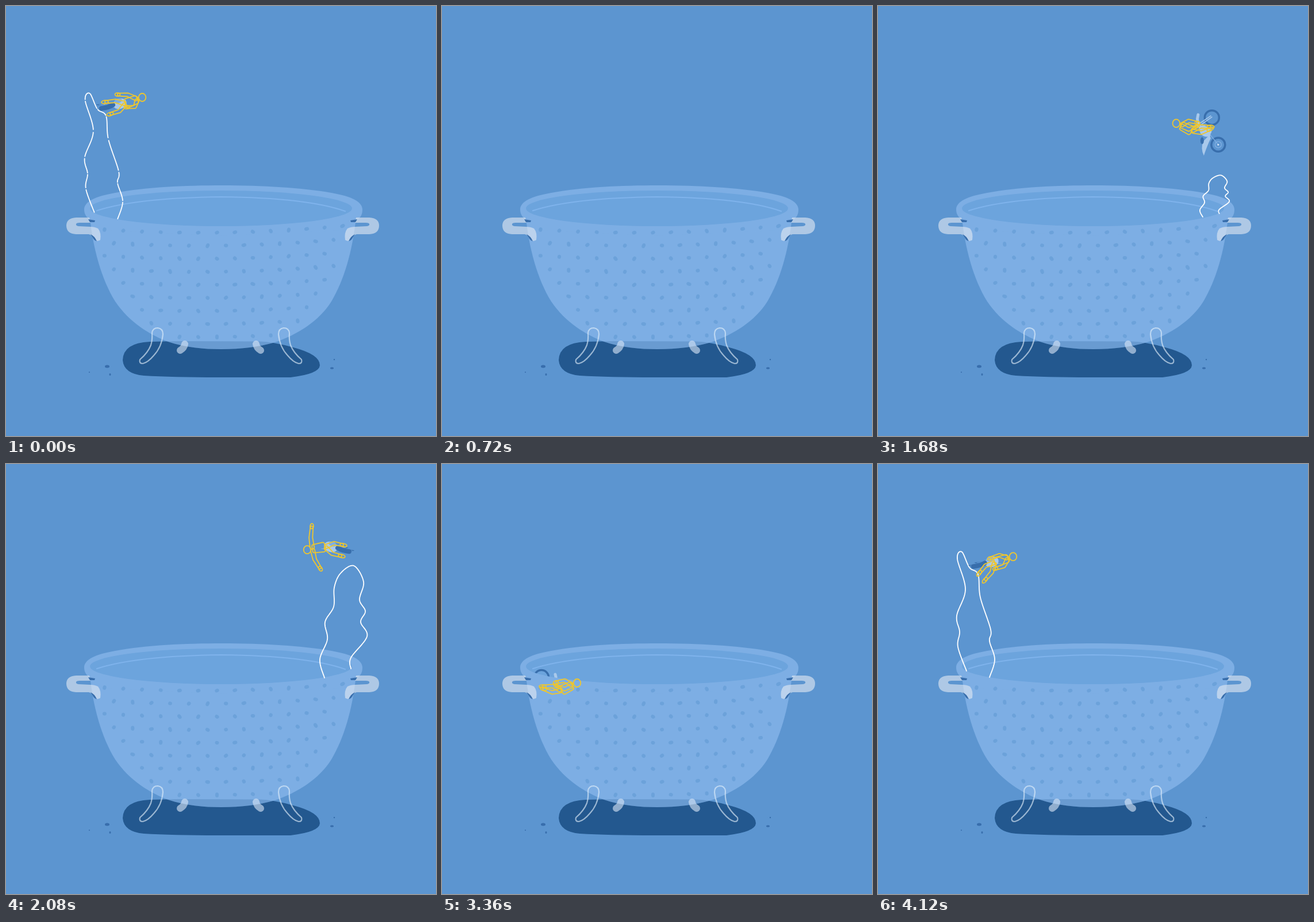
An HTML page with a canvas for the animation above (4.16 s loop, 748 px wide and 748 px high).

```html
<!DOCTYPE html>
<html lang="en">
<head>
<meta charset="utf-8">
<title>Colander ride</title>
<style>
html, body { margin: 0; width: 100%; height: 100%; overflow: hidden; background: #5c95d0; }
canvas { display: block; width: 100vw; height: 100vh; }
</style>
</head>
<body>
<canvas id="stage" width="748" height="748"></canvas>
<script>
const c = document.getElementById('stage').getContext('2d');
const LOOP = 4160, STEP = 40, APEX = 780;
const BG = '#5c95d0', BOWL = '#7daee4', INNER = '#6ca4dd', DARK = '#386eac';
const LIGHT = '#a9c9eb', MIST = '#80afe2', YELLOW = '#efc62c', GLAZE = 'rgba(228,236,244,.6)';

const clamp = (v, a = 0, b = 1) => Math.min(b, Math.max(a, v));
const smooth = v => { v = clamp(v); return v * v * (3 - 2 * v); };
const mix = (a, b, k) => a + (b - a) * k;
const rand = i => { const v = Math.sin(i * 12.9898 + 4) * 43758.5453; return v - Math.floor(v); };

function fill(path, color) { c.fillStyle = color; c.fill(path); }
function stroke(path, color, width) {
  c.strokeStyle = color; c.lineWidth = width; c.stroke(path);
}
function oval(x, y, rx, ry = rx, turn = 0) {
  const p = new Path2D();
  p.ellipse(x, y, rx, ry, turn, 0, 7);
  return p;
}
function placed(x, y, side, draw) {
  c.save();
  c.translate(x, y);
  c.scale(side, 1);
  draw();
  c.restore();
}
function mirrored(axis, draw) {
  draw();
  placed(axis, 0, -1, draw);
}

// ---- colander ----
const shadow = new Path2D('M250 584Q204 586 203 616Q205 640 240 643Q290 646 370 646L495 646Q545 640 546 625Q546 606 500 594Q465 584 440 583.5L300 583Z');
const body = new Path2D('M146 368C151 420 166 476 190 514C214 550 250 572 282 584C312 594 344 597 374 597C410 597 440 593 468 585C506 572 545 548 566 514C588 476 602 430 609 368Z');
const rim = new Path2D('M136 354C136 340 156 331 190 325C245 315 310 312 376 312C446 312 515 316 566 325C600 331 620 340 620 354C620 364 616 369 609 373L590 390L374 400L164 390L147 372C140 368 136 362 136 354Z');
const hollow = oval(374, 352, 228, 31);
const waterline = new Path2D('M158 356C210 339 290 333 374 332C470 333 545 341 590 357');
const handle = new Path2D('M145 368L122 368Q105 369 105 382Q105 396 122 397L144 397Q150 398 153 406Q158 411 164 407Q166 394 160 387Q154 384 146 384L126 383Q121 382 122 379Q123 377 128 377L147 377Z');
const handleShade = new Path2D('M143 371L155 373L154 376L146 376ZM147 397Q154 400 158 409Q153 408 151 403Z');
const foot = new Path2D('M254 569Q255 560 264 560Q273 561 273 571Q271 593 257 608Q247 620 238 622Q231 622 233 615Q247 603 252 590Q255 580 254 569Z');
const backFoot = new Path2D('M311 588Q310 595 303 599');

// staggered rows that narrow with the bowl and bend up at the sides
function drawHoles() {
  for (let row = 0; row < 9; row++) {
    const half = 212 * Math.sqrt(1 - (row / 9.24) ** 2);
    for (let j = -6; j <= 7; j++) {
      const shift = j - (row % 2) / 2;
      const dx = shift * (shift < 0 ? 32.6 : 31.2) - 10;
      if (Math.abs(dx) > half) continue;
      const side = dx / 205, seed = row * 20 + j;
      const y = 394 + 22.7 * row - 8 * side * side - 3 * side;
      fill(oval(377 + dx, y, 3.4 + rand(seed), 3.1, rand(seed + 9) * 3), '#6ca2da');
    }
  }
}

function drawColander() {
  c.fillStyle = BG;
  c.fillRect(0, 0, 748, 748);
  fill(shadow, '#23588f');
  fill(oval(176, 627, 4, 2.5), DARK);
  fill(oval(181, 641, 1.5, 2), DARK);
  fill(oval(145, 637, 1), DARK);
  fill(oval(571, 615, 1.2), DARK);
  fill(oval(567, 630, 3, 1.7), DARK);
  fill(body, BOWL);
  c.save();
  c.clip(body);
  fill(shadow, 'rgba(35,88,143,.22)');
  c.restore();
  fill(rim, BOWL);
  fill(hollow, INNER);
  stroke(waterline, '#7fb3ec', 2.2);
  drawHoles();
  mirrored(754, () => {
    fill(handle, GLAZE);
    fill(handleShade, DARK);
  });
  mirrored(747, () => stroke(foot, 'rgba(228,240,252,.62)', 2.2));
  mirrored(746, () => stroke(backFoot, 'rgba(218,232,248,.6)', 12));
}

// ---- trail: grows from the bowl, then drifts apart into scraps ----
function drawTrail({ points, mid, fadeFor }, s) {
  const grow = smooth((s - 120) / 580);
  const fade = Math.max(0, (s - APEX) / fadeFor);
  if (grow < .02 || fade > 1.4) return;
  const last = points.length - 1;
  const spline = (u, axis) => {
    const i = Math.min(Math.floor(u), last - 1), k = u - i;
    const [p, q, r, z] = [-1, 0, 1, 2].map(d => points[clamp(i + d, 0, last)][axis]);
    return q + .5 * k * (r - p + k * (2 * p - 5 * q + 4 * r - z + k * (3 * (q - r) + z - p)));
  };
  const line = new Path2D();
  let pen = false;
  for (let i = 0; i <= last * 20; i++) {
    const u = i / 20, piece = Math.floor(u);
    const worn = fade * (.5 + rand(piece + mid));
    if (fade && Math.abs(u - piece - .5) > .5 * (1 - worn)) { pen = false; continue; }
    const x0 = spline(u, 0), y0 = spline(u, 1), height = (364 - y0) / 200;
    const x = mid + (x0 - mid) * (.4 + .6 * grow + .15 * fade * height);
    const y = mix(364, y0, grow) - 19 * fade * height;
    pen ? line.lineTo(x, y) : line.moveTo(x, y);
    pen = true;
  }
  stroke(line, '#fff', 1.8 * (1 - .48 * fade));
}

// ---- bike: k flips it from nose up (-1) over edge-on (0) to nose down (1) ----
const blade = new Path2D('M6 -42Q12 -30 7 -17L-4 -6L-6 -12Q0 -24 6 -42Z');
const frame = new Path2D('M-5 -8Q6 -12 12 -3L15 8Q8 13 2 9L-7 4Z');
const fork = new Path2D('M-8 25L23 3M-6 27L25 6');
const bar = new Path2D('M11 5Q20 16 16 29');
const spokes = new Path2D('M-19 -23L-2 -2');
const tyre = new Path2D('M-24 4Q-12 3 -4 -2');

function drawBike(k) {
  c.save();
  c.scale(1, Math.abs(k) < .08 ? .08 : k);
  stroke(oval(-19, -23, 12), DARK, 3.5);
  stroke(oval(-19, -23, 5.5), MIST, 1.3);
  stroke(spokes, MIST, 1.3);
  fill(oval(-19, -23, 1.5), '#d4e5f7');
  stroke(oval(-8, 24, 12.5), DARK, 3.5);
  fill(blade, LIGHT);
  fill(frame, LIGHT);
  stroke(oval(-2, 0, 4.5), LIGHT, 2);
  fill(oval(9, -16, 3, 6), DARK);
  stroke(fork, LIGHT, 1.7);
  stroke(bar, LIGHT, 5);
  c.restore();
  if (Math.abs(k) < .4) {
    fill(oval(8, -4, 12, 9, -.3), LIGHT);
    fill(oval(5, -9, 7, 4, -.3), MIST);
    stroke(tyre, DARK, 8);
  }
}

// ---- rider: head, hip, two hands, two feet; the other joints follow ----
const ride = [[54, -14], [27, -1], [17, -15], [18, -9], [-6, -8], [-5, -4]];
const tuck = [[45, -13], [13, -3], [5, -10], [14, 8], [-14, 16], [-4, 28]];
const reach = [[47, -15], [18, -4], [4, -20], [20, 2], [-18, -7], [-9, 14]];
const star = [[49, 1], [18, -4], [41, -40], [26, 34], [-14, -7], [-11, 12]];
const land = [[47, -31], [16, -21], [21, 2], [26, -12], [-6, 0], [1, 4]];

// closed smooth outline around a chain of joints, tapering from w to tip
function limb(joints, w, tip) {
  const one = [], two = [], n = joints.length - 1;
  joints.forEach(([x, y], i) => {
    const p = joints[Math.max(0, i - 1)], q = joints[Math.min(n, i + 1)];
    const turn = Math.atan2(q[1] - p[1], q[0] - p[0]), r = mix(w, tip, i / n);
    const dx = -Math.sin(turn) * r, dy = Math.cos(turn) * r;
    one.push([x + dx, y + dy]);
    two.unshift([x - dx, y - dy]);
  });
  const ring = [...one, ...two], path = new Path2D();
  const radius = Math.min(3, tip);
  path.moveTo((ring[0][0] + ring[ring.length - 1][0]) / 2, (ring[0][1] + ring[ring.length - 1][1]) / 2);
  ring.forEach((p, i) => path.arcTo ? path.arcTo(...p, ...ring[(i + 1) % ring.length], radius) : path.lineTo(...p));
  path.closePath();
  stroke(path, YELLOW, 1.8);
}

// middle joint of an arm or leg: bends more as its ends come closer
function bend(a, b, side) {
  const dx = b[0] - a[0], dy = b[1] - a[1], d = Math.hypot(dx, dy) || 1;
  const out = side * Math.max(0, 46 - d) * .35 / d;
  return [(a[0] + b[0]) / 2 - dy * out, (a[1] + b[1]) / 2 + dx * out];
}

function drawRider([head, hip, ...ends]) {
  const d = Math.hypot(hip[0] - head[0], hip[1] - head[1]);
  const shoulder = head.map((v, i) => mix(v, hip[i], 9 / d));
  limb([shoulder, hip], 7, 8.5);
  ends.forEach((end, i) => {
    const leg = i > 1, root = leg ? hip : shoulder;
    const joint = bend(root, end, i % 2 ? -1 : 1);
    const turn = Math.atan2(end[1] - joint[1], end[0] - joint[0]);
    limb([root, joint, end], 3.8, 2.4);
    stroke(oval(...end, leg ? 6 : 4.5, 2.9, turn), YELLOW, 1.8);
  });
  stroke(oval(...head, 6.3, 7), YELLOW, 1.8);
}

// ---- motion ----
function poseAt(keys, s) {
  let i = 0;
  while (i < keys.length - 2 && s >= keys[i + 1][0]) i++;
  const [from, a] = keys[i], [to, b] = keys[i + 1], k = smooth((s - from) / (to - from));
  return a.map((p, j) => p.map((v, axis) => mix(v, b[j][axis], k)));
}

const jumps = [
  {
    start: 3360, length: 1520, side: 1, x: [181, 190], top: 174, rise: 221, fall: 252,
    poses: [[0, ride], [420, ride], [760, tuck], [800, reach], [1100, land]],
    trail: {
      mid: 174, fadeFor: 460,
      points: [[154, 360], [139, 318], [142, 292], [137, 264], [152, 218], [138, 165], [146, 153],
        [159, 180], [174, 192], [178, 232], [196, 288], [194, 308], [203, 340], [194, 371]]
    }
  },
  {
    start: 1320, length: 1600, side: -1, x: [572, 573], top: 148, rise: 242, fall: 203,
    poses: [[0, ride], [420, ride], [760, star], [1120, land]],
    trail: {
      mid: 583, fadeFor: 540,
      points: [[554, 372], [546, 340], [559, 305], [555, 275], [570, 248], [571, 215], [582, 190],
        [605, 177], [622, 205], [615, 236], [625, 256], [617, 275], [628, 300], [600, 337], [600, 356]]
    }
  }
];

// everything above the near edge of the opening
const opening = new Path2D('M0 0H748V352H602');
opening.ellipse(374, 352, 228, 31, 0, 0, Math.PI);
opening.lineTo(0, 352);
opening.closePath();

function drawJump(jump, t) {
  const s = (t - jump.start + LOOP) % LOOP;
  if (s >= jump.length) return;
  const v = (s - APEX) / APEX;
  const x = mix(...jump.x, smooth(s / 500));
  const y = jump.top + (v < 0 ? jump.rise * v * v : jump.fall * v ** 3);
  const flip = Math.sin(clamp((s - APEX) / 320, -1, 1) * Math.PI / 2);
  const overRim = jump.side > 0 && s < 300;
  const rider = () => placed(x, y, jump.side, () => drawRider(poseAt(jump.poses, s)));

  drawTrail(jump.trail, s);
  c.save();
  c.clip(opening);
  placed(x, y, jump.side, () => drawBike(flip));
  if (!overRim && s > 0) rider();
  c.restore();
  if (overRim) rider();
}

function render(now) {
  const t = Math.floor(now % LOOP / STEP) * STEP;
  c.lineCap = c.lineJoin = 'round';
  drawColander();
  jumps.forEach(jump => drawJump(jump, t));
}

const begin = performance.now();
function tick() {
  render(performance.now() - begin);
  requestAnimationFrame(tick);
}
tick();
</script>
</body>
</html>
```
